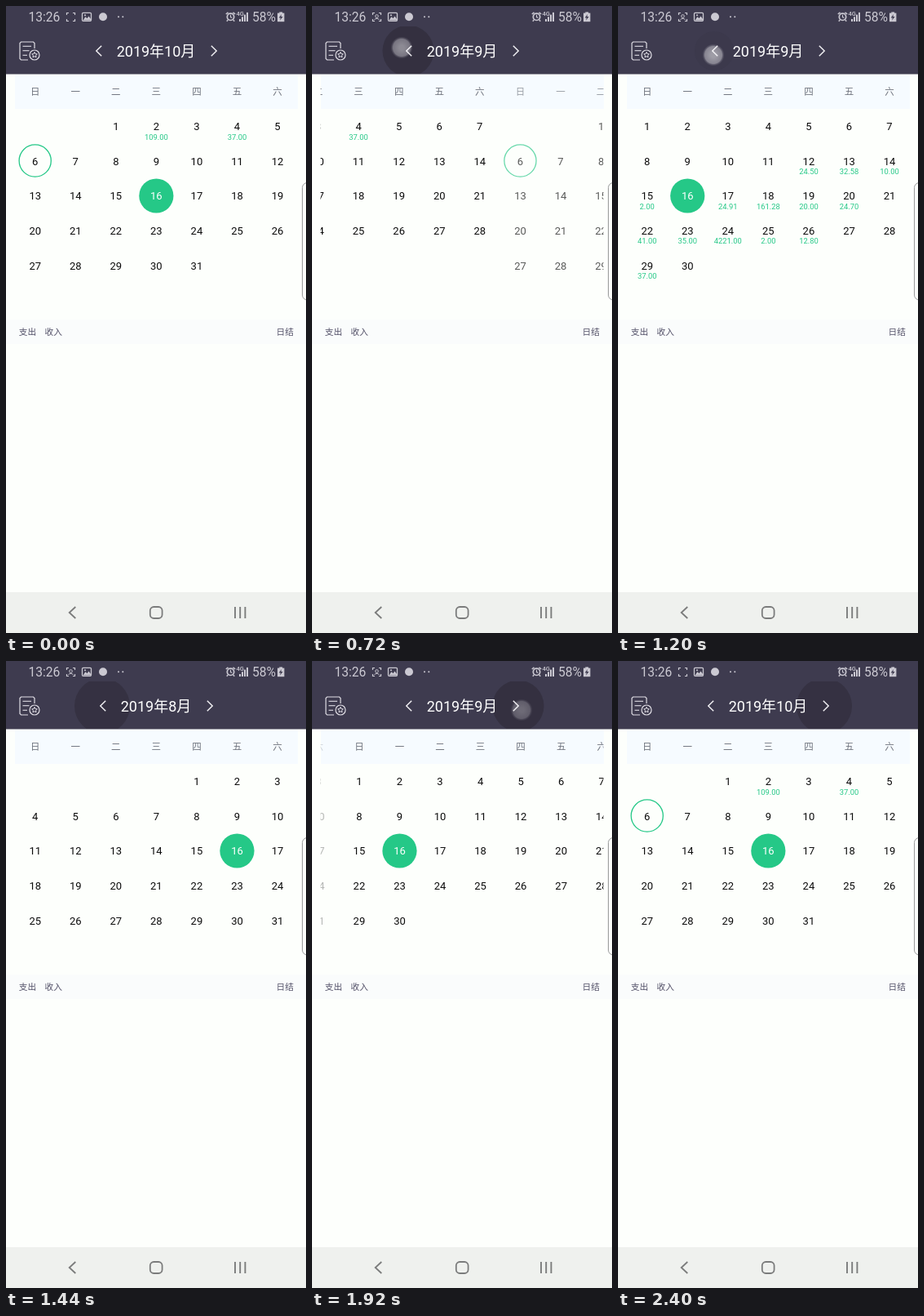
Write an HTML page with a canvas that moves like this. It is 368 by 768 pixels and loops after 2520 ms.

```html
<!DOCTYPE html>
<html lang="zh-CN">
<head>
<meta charset="utf-8">
<title>Calendar</title>
<style>
html, body { margin: 0; width: 100%; height: 100%; overflow: hidden; background: #fdfffc; }
canvas { display: block; width: 368px; height: 768px; }
</style>
</head>
<body>
<canvas id="stage"></canvas>
<script>
const W = 368, H = 768, LOOP = 2520, STEP = 120, LEAD = 16;
const GREEN = '#25c887', BAR = '#3e3b4f', PALE = '#cbc9d2';
const LEFT = 11, PANE = 347, COL = 49.55, ROW = 42.55, SLIDE = 190;
const FONT = 'Roboto, "Noto Sans CJK SC", "Noto Sans CJK JP", sans-serif';

// Amount per day, by month
const AMOUNTS = {
  8: {},
  9: { 12: '24.50', 13: '32.58', 14: '10.00', 15: '2.00', 17: '24.91', 18: '161.28', 19: '20.00',
       20: '24.70', 22: '41.00', 23: '35.00', 24: '4221.00', 25: '2.00', 26: '12.80', 29: '37.00' },
  10: { 2: '109.00', 4: '37.00' }
};

// at: finger down, go: slide start
const TAPS = [
  { at: 600, go: 666, from: 10, to: 9, x: 110, y: 51, fade: 0.85 },
  { at: 1200, go: 1200, from: 9, to: 8, x: 117, y: 60, fade: 0.6 },
  { at: 1800, go: 1806, from: 8, to: 9, x: 257, y: 60, fade: 0.55 },
  { at: 2160, go: 2200, from: 9, to: 10, x: 245, y: 54, fade: 0.6 }
];

const canvas = document.getElementById('stage');
const ctx = canvas.getContext('2d');
const dpr = window.devicePixelRatio || 1;
canvas.width = W * dpr;
canvas.height = H * dpr;

function rect(x, y, w, h, color) {
  ctx.fillStyle = color;
  ctx.fillRect(x, y, w, h);
}

function text(str, x, y, size, color, align = 'center', weight = 400) {
  ctx.font = `${weight} ${size}px ${FONT}`;
  ctx.textAlign = align;
  ctx.fillStyle = color;
  ctx.fillText(str, x, y);
}

function disc(x, y, r, color) {
  ctx.beginPath();
  ctx.arc(x, y, r, 0, 7);
  ctx.fillStyle = color;
  ctx.fill();
}

function ring(x, y, r, color, width) {
  ctx.beginPath();
  ctx.arc(x, y, r, 0, 7);
  ctx.strokeStyle = color;
  ctx.lineWidth = width;
  ctx.stroke();
}

function box(x, y, w, h, r, color, width) {
  ctx.beginPath();
  ctx.roundRect(x, y, w, h, r);
  ctx.strokeStyle = color;
  ctx.lineWidth = width;
  ctx.stroke();
}

function line(points, color, width) {
  ctx.beginPath();
  points.forEach(([x, y]) => ctx.lineTo(x, y));
  ctx.strokeStyle = color;
  ctx.lineWidth = width;
  ctx.stroke();
}

function poly(points, color) {
  ctx.beginPath();
  points.forEach(([x, y]) => ctx.lineTo(x, y));
  ctx.fillStyle = color;
  ctx.fill();
}

function chevron(x, y, dir, w, h, color, width) {
  line([[x - dir * w, y - h], [x + dir * w, y], [x - dir * w, y + h]], color, width);
}

function statusBar(t) {
  text('13:26', 27.5, 19, 15.6, PALE, 'left');
  for (const sx of [-1, 1]) for (const sy of [-1, 1]) {
    const x = 79.5 + sx * 5, y = 13.5 + sy * 5;
    line([[x - sx * 2.5, y], [x, y], [x, y - sy * 2.5]], PALE, 1.2);
  }
  if (t >= 360 && t < 2160) {
    ring(79.5, 12.5, 1.8, PALE, 1);
    line([[76.5, 17], [78, 15.4], [81, 15.4], [82.5, 17]], PALE, 1);
  }
  box(93.5, 8.3, 11, 10, 1.2, PALE, 1.3);
  poly([[94.5, 17.5], [97.5, 13.3], [99.5, 15.3], [101.5, 12.5], [104, 16], [104, 17.5]], PALE);
  disc(97, 11.3, 1, PALE);
  disc(119, 13.2, 5, PALE);
  disc(138, 13.3, 1, PALE);
  disc(143.3, 13.3, 1, PALE);

  ring(275.5, 13.3, 4.2, PALE, 1.7);
  line([[275.5, 10.8], [275.5, 13.6], [277.3, 14.6]], PALE, 1.1);
  line([[269.8, 10], [272.5, 7.8]], PALE, 1.6);
  line([[278.5, 7.8], [281.2, 10]], PALE, 1.6);
  line([[272.2, 17], [270.8, 18.8]], PALE, 1.4);
  line([[278.8, 17], [280.2, 18.8]], PALE, 1.4);
  text('4G', 282.5, 12, 7.5, PALE, 'left', 500);
  for (let i = 0; i < 4; i++) {
    const h = 3 + i * 2.7;
    rect(286 + i * 3, 19 - h, 2, h, PALE);
  }
  text('58%', 302, 19, 15.6, PALE, 'left');
  rect(335.3, 7.4, 3.8, 1.6, PALE);
  rect(333, 8.6, 8.4, 10.6, PALE);
  poly([[338, 10], [334.7, 14.4], [336.9, 14.4], [336, 17.8], [339.6, 13], [337.3, 13]], BAR);
}

function noteIcon() {
  const c = '#e0dee5';
  line([[27, 66], [18.5, 66], [17, 64.5], [17, 45.5], [18.5, 44], [33.5, 44], [35, 45.5], [35, 52]], c, 1.2);
  line([[20.5, 49.3], [31, 49.3]], c, 1.1);
  line([[20.5, 54.7], [28.5, 54.7]], c, 1.1);
  line([[20.5, 60.3], [26, 60.3]], c, 1.1);
  ring(35, 60, 6, c, 1.2);
  ctx.beginPath();
  for (let i = 0; i < 10; i++) {
    const a = -Math.PI / 2 + i * Math.PI / 5, r = i % 2 ? 1.7 : 3.5;
    ctx.lineTo(35 + r * Math.cos(a), 60 + r * Math.sin(a));
  }
  ctx.closePath();
  ctx.lineWidth = 1;
  ctx.stroke();
}

function ripples(t) {
  ctx.save();
  ctx.beginPath();
  ctx.rect(0, 25, W, 58);
  ctx.clip();
  for (const tap of TAPS) {
    const k = (t - tap.at) / STEP;
    if (k < 0 || k >= 3) continue;
    const alpha = k < 1 ? 0.1 + 0.4 * k : Math.min(0.5, 0.45 * (3 - k));
    const r = Math.min(34, 24 + 7.5 * k);
    disc(tap.to < tap.from ? 118 : 253, 55, r, `rgba(42,39,50,${alpha})`);
  }
  ctx.restore();
}

function touches(t) {
  for (const tap of TAPS) {
    const k = (t - tap.at) / STEP;
    if (k < 0 || k >= 2) continue;
    ctx.globalAlpha = k < 1 ? 1 : tap.fade;
    const g = ctx.createRadialGradient(tap.x, tap.y, 3, tap.x, tap.y, 13.5);
    g.addColorStop(0, 'rgba(205,204,209,.68)');
    g.addColorStop(0.72, 'rgba(185,183,191,.6)');
    g.addColorStop(0.85, 'rgba(150,148,160,.3)');
    g.addColorStop(1, 'rgba(150,148,160,0)');
    disc(tap.x, tap.y, 13.5, g);
    ctx.globalAlpha = 1;
  }
}

function header(t, month) {
  rect(0, 0, W, 83.5, BAR);
  statusBar(t);
  noteIcon();
  ripples(t);
  const label = `2019年${month}月`;
  text(label, 184, 61.5, 18, '#fff');
  const gap = month > 9 ? 70.3 : 65.3;
  touches(t);
  chevron(184.3 - gap, 55, -1, 3.2, 6.3, '#f4f3f6', 1.4);
  chevron(184.7 + gap, 55, 1, 3.2, 6.3, '#f4f3f6', 1.4);
}

function monthPane(month, shift, alpha, amounts) {
  const first = new Date(2019, month - 1, 1).getDay();
  const count = new Date(2019, month, 0).getDate();
  ctx.save();
  ctx.translate(shift, 0);
  ctx.globalAlpha = alpha;
  [...'日一二三四五六'].forEach((d, i) => text(d, 35.7 + i * COL, 109, 11.5, '#70747e', 'center', 300));
  for (let day = 1; day <= count; day++) {
    const cell = first + day - 1;
    const x = 35.7 + (cell % 7) * COL, y = 147.6 + Math.floor(cell / 7) * ROW;
    const picked = day === 16;
    if (picked) disc(x, y - 0.2, 21.1, GREEN);
    if (month === 10 && day === 6) ring(x, y - 0.6, 19.6, GREEN, 1.3);
    text(day, x, y + 4.7, 13, picked ? '#fff' : '#0c0c0c');
    if (amounts[day]) text(amounts[day], x, y + 16, 9.4, GREEN);
  }
  ctx.restore();
}

function calendar(t, month, data) {
  rect(LEFT, 84, PANE, 42, '#f6fbff');
  ctx.save();
  ctx.beginPath();
  ctx.rect(LEFT - 0.5, 84, PANE, 290);
  ctx.clip();
  const tap = TAPS.find(s => t >= s.go && t < s.go + SLIDE);
  if (tap) {
    const q = 1 - (1 - (t - tap.go) / SLIDE) ** 3;
    const dir = Math.sign(tap.to - tap.from);
    monthPane(tap.from, -dir * PANE * q, 1 - 0.8 * q * q, AMOUNTS[data]);
    monthPane(tap.to, dir * PANE * (1 - q), 1, AMOUNTS[data]);
  } else {
    monthPane(month, 0, 1, AMOUNTS[data]);
  }
  ctx.restore();
}

function footer() {
  rect(0, 384, W, 30, '#fafcfc');
  text('支出', 15.7, 403, 10.7, '#55536a', 'left');
  text('收入', 47.5, 403, 10.7, '#55536a', 'left');
  text('日结', 353, 403, 10.7, '#55536a', 'right');

  ctx.beginPath();
  ctx.roundRect(363.5, 216.5, 20, 143.5, 6);
  ctx.fillStyle = '#fdfffc';
  ctx.fill();
  ctx.strokeStyle = '#98999a';
  ctx.lineWidth = 1;
  ctx.stroke();

  rect(0, 718, W, 50, '#eff1ee');
  const c = '#7b7c7c';
  chevron(81.5, 743, -1, 3.8, 7, c, 1.8);
  box(176.8, 736, 14.8, 14, 4.5, c, 1.8);
  for (let i = 0; i < 3; i++) line([[281 + i * 6.2, 736], [281 + i * 6.2, 750]], c, 1.9);
}

function draw(t) {
  ctx.setTransform(dpr, 0, 0, dpr, 0, 0);
  rect(0, 0, W, H, '#fdfffc');
  let month = 10, data = 10;
  for (const tap of TAPS) {
    if (t > tap.go) month = tap.to;
    if (t >= tap.at + 2 * STEP) data = tap.to;
  }
  header(t, month);
  calendar(t, month, data);
  footer();
}

const start = performance.now();

function tick() {
  const t = (performance.now() - start + LEAD) % LOOP;
  draw(Math.floor(t / STEP) * STEP);
  requestAnimationFrame(tick);
}
tick();
</script>
</body>
</html>
```
